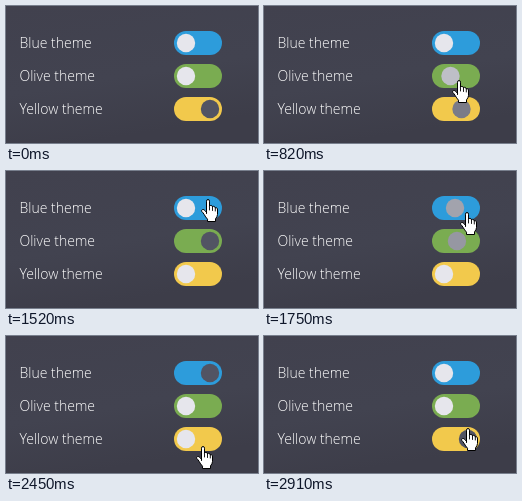
An HTML page that plays this animation: 252 px wide and 137 px high, repeating every 2990 ms.

```html
<!DOCTYPE html>
<html lang="en">
<head>
<meta charset="utf-8">
<title>Theme switches</title>
<style>
html, body { margin: 0; width: 100%; height: 100%; overflow: hidden; background: #41414e; }
svg { display: block; width: 252px; height: 137px; }
text { font: 300 14px "Open Sans", sans-serif; fill: #fff; }
</style>
</head>
<body>
<svg viewBox="0 0 252 137">
  <defs>
    <linearGradient id="bg" x1="0" y1="0" x2=".3" y2="1">
      <stop offset="0" stop-color="#41414e"/>
      <stop offset=".6" stop-color="#424350"/>
      <stop offset="1" stop-color="#3d3d49"/>
    </linearGradient>
  </defs>
  <rect width="252" height="137" fill="url(#bg)"/>
  <g id="rows"></g>
  <g id="hand" stroke="#000" stroke-linejoin="round" stroke-linecap="round">
    <path fill="#fff" d="M5.5 14.5V2.2Q5.5.5 7 .5T8.5 2.2V7.2Q9 6.2 10.2 6.4 11.5 6.6 11.5 8 12.2 7 13.2 7.4 14.2 7.8 14.3 9 15.2 8.2 16 9 16.5 9.6 16.5 11V15.5Q16.3 18 14.5 19.8V22.5H6.5V20.2Q4.5 18 3.2 15.5 2 13.6 .8 12.5.2 11 1.5 10.5 3 10.2 4.2 11.8L5.5 13.4"/>
    <path fill="none" stroke-width=".9" d="M8.5 7.5V11M11.5 8V11.5M14.3 9V12"/>
  </g>
</svg>
<script>
const LOOP = 2990;
const OFF = [230, 230, 236], ON = [82, 84, 99];

// [time, x, y], each held until the next
const cursorSteps = [
  [0, 0, 200], [70, 184, 98], [140, 180, 80], [210, 176, 66],
  [440, 181, 66], [520, 185, 70], [600, 188, 74],
  [1210, 194, 66], [1290, 195, 55], [1360, 195, 43], [1440, 195, 34],
  [1520, 195, 28], [1590, 195, 34], [1670, 196, 41],
  [1900, 194, 55], [1980, 191, 82], [2050, 188, 103], [2130, 186, 112],
  [2450, 190, 110], [2530, 192, 100], [2600, 194, 93], [2760, 197, 92]
];

// Each click hands the active state from one switch to another
const clicks = [
  { from: 2, to: 1, steps: [[750, .04], [820, .27], [900, .76], [980, 1]] },
  { from: 1, to: 0, steps: [[1750, .46], [1830, .92], [1900, 1]] },
  { from: 0, to: 2, steps: [[2760, .25], [2840, .8], [2910, 1]] }
];

function add(parent, tag, attrs) {
  const el = document.createElementNS("http://www.w3.org/2000/svg", tag);
  for (const key in attrs) el.setAttribute(key, attrs[key]);
  return parent.appendChild(el);
}

const rows = document.getElementById("rows");
const hand = document.getElementById("hand");
const knobs = [["Blue", "#2d9cdb"], ["Olive", "#7aac51"], ["Yellow", "#f2c94c"]]
  .map(([name, color], i) => {
    const y = 37 + i * 33;
    add(rows, "text", { x: 13.5, y: y + 5 }).textContent = name + " theme";
    add(rows, "rect", { x: 168, y: y - 12, width: 48, height: 24, rx: 12, fill: color });
    return add(rows, "circle", { cy: y, r: 9.2 });
  });

const held = (steps, t) => steps.filter(s => s[0] <= t).pop();

function draw(t) {
  const state = [0, 0, 1];
  for (const { from, to, steps } of clicks) {
    const step = held(steps, t);
    if (!step) continue;
    state[from] = 1 - step[1];
    state[to] = step[1];
  }
  knobs.forEach((knob, i) => {
    const p = state[i];
    knob.setAttribute("cx", 180 + 24 * p);
    knob.setAttribute("fill", `rgb(${OFF.map((c, k) => Math.round(c + (ON[k] - c) * p))})`);
  });
  const [, x, y] = held(cursorSteps, t);
  hand.setAttribute("transform", `translate(${x} ${y})`);
}

const start = performance.now();
function tick() {
  draw((performance.now() - start) % LOOP);
  requestAnimationFrame(tick);
}
tick();
</script>
</body>
</html>
```
